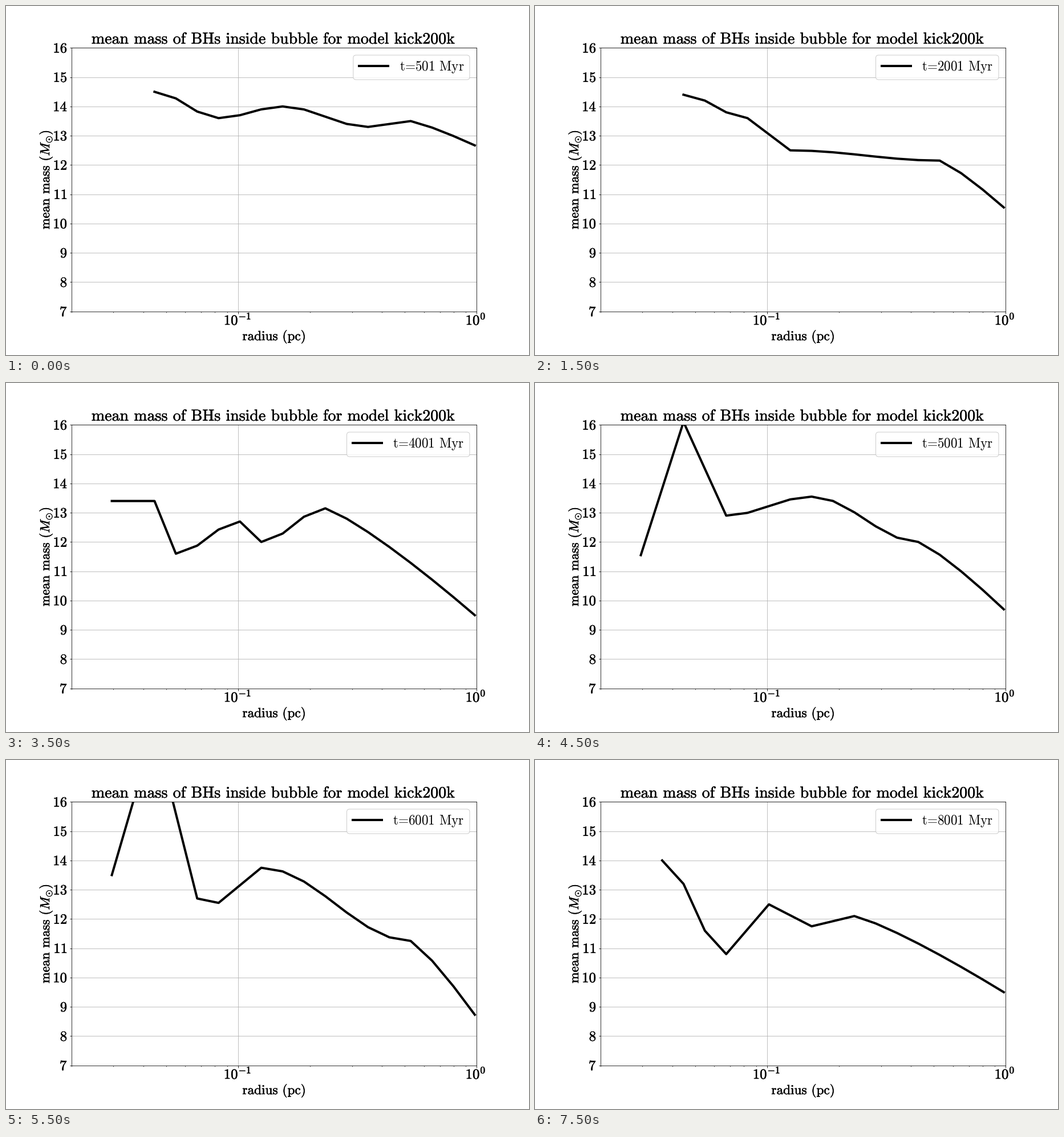
These frames come from a looping animation (917 px wide and 611 px high, 8 s). A matplotlib script:

```python
import math

import matplotlib.pyplot as plt
import numpy as np
from matplotlib.animation import FuncAnimation
from matplotlib.patches import FancyBboxPatch
from matplotlib.patheffects import withStroke
from matplotlib.ticker import NullFormatter

W, H, DPI = 917, 611, 64
PX = 72 / DPI  # points per pixel
FRAMES, INTERVAL = 16, 500
BINS = np.arange(19)
RADIUS = 10 ** (-0.008 - 0.0895 * BINS[::-1])

plt.rcParams["mathtext.fontset"] = "cm"

# Turning points (bin, mean mass) of the profile at some steps.
PROFILES = {
    0: [(3, 14.5), (6, 13.6), (9, 14.0), (13, 13.3), (15, 13.5), (18, 12.67)],
    3: [(3, 14.4), (6, 13.6), (8, 12.5), (15, 12.15), (18, 10.55)],
    7: [(1, 13.4), (3, 13.4), (4, 11.6), (7, 12.7), (8, 12.0), (11, 13.15),
        (18, 9.5)],
    9: [(1, 11.55), (3, 16.1), (5, 12.9), (9, 13.55), (14, 12.0), (18, 9.7)],
    11: [(1, 13.5), (3, 18.5), (5, 12.7), (6, 12.55), (8, 13.75), (15, 11.25),
         (18, 8.73)],
    13: [(0, 14.35), (2, 14.35), (8, 12.0), (10, 12.8), (14, 11.65),
         (17, 9.9), (18, 9.9)],
    15: [(2, 14.0), (5, 10.8), (7, 12.5), (9, 11.75), (11, 12.1), (18, 9.5)],
}


def profile(points):
    """Ease between the turning points, then fall away towards the edge."""
    k, m = np.array(points).T
    seg = np.clip(np.searchsorted(k, BINS, side="right") - 1, 0, len(k) - 2)
    u = np.clip((BINS - k[seg]) / (k[seg + 1] - k[seg]), 0, 1)
    ease = np.where(seg == len(k) - 2, u ** 1.2, (1 - np.cos(np.pi * u)) / 2)
    return m[seg] + (m[seg + 1] - m[seg]) * ease


def masses(step):
    """First filled bin and the mean masses, blended between known steps."""
    a = max(s for s in PROFILES if s <= step)
    b = min(s for s in PROFILES if s >= step)
    w = (step - a) / max(b - a, 1)
    p, q = PROFILES[a], PROFILES[b]
    first = math.ceil((1 - w) * p[0][0] + w * q[0][0] - 1e-9)
    return first, ((1 - w) * profile(p) + w * profile(q))[first:]


def rm(s):
    """Upright math text with full word spaces and a tight equals sign."""
    s = s.replace(" ", r"\hspace{0.38}")
    s = s.replace("=", r"\hspace{-0.2}=\hspace{-0.2}")
    return r"\mathrm{%s}" % s


fig = plt.figure(figsize=(W / DPI, H / DPI), dpi=DPI, facecolor="white")

ax = fig.add_axes([0.125, 0.125, 0.775, 0.755])
ax.set_xscale("log")
ax.set_xlim(0.02, 1)
ax.set_ylim(7, 16)
ax.set_yticks(range(7, 17))
ax.xaxis.set_minor_formatter(NullFormatter())
ax.grid(True, color="#b0b0b0", lw=0.8 * PX)
ax.tick_params(which="major", length=3.5 * PX, width=0.8 * PX,
               labelbottom=False, labelleft=False)
ax.tick_params(which="minor", length=2 * PX, width=0.6 * PX)
for spine in ax.spines.values():
    spine.set_linewidth(0.8 * PX)
curve, = ax.plot([], [], color="black", lw=4 * PX,
                 solid_capstyle="projecting", solid_joinstyle="round")

# Pixel-based layer for the lettering and the legend.
page = fig.add_axes([0, 0, 1, 1])
page.set_xlim(0, W)
page.set_ylim(H, 0)
page.axis("off")


def text(x, y, s, size, ha="center", **kw):
    return page.text(x, y, f"${s}$", fontsize=size * PX, ha=ha,
                     va="baseline", **kw)


def label(*args, **kw):
    """Text with slightly heavier strokes."""
    heavy = [withStroke(linewidth=0.5 * PX, foreground="black")]
    return text(*args, path_effects=heavy, **kw)


label(469, 66, rm("mean mass of BHs inside bubble for model kick200k"), 27.9)
label(470, 585, rm("radius (pc)"), 23.3)
label(76, 304, rm("mean mass (") + r"M_{\odot}" + rm(")"), 23.3,
      rotation=90, rotation_mode="anchor")
for v in range(7, 17):
    y = H * (0.12 + 0.755 * (16 - v) / 9)
    label(108, y + 8.3, rm(str(v)), 24.7, ha="right")
label(406, 558, "10^{-1}", 24.7)
label(823.5, 558, "10^{0}", 24.7)

box = FancyBboxPatch((597.5, 86), 215.5, 43,
                     boxstyle="round,pad=0,rounding_size=5",
                     fc=(1, 1, 1, 0.8), ec="#cccccc", lw=PX)
page.add_patch(box)
handle, = page.plot([], [], color="black", lw=4 * PX,
                    solid_capstyle="projecting")
stamp = text(803, 113.5, rm("t=501 Myr"), 23.2, ha="right")


def draw(step):
    first, m = masses(step)
    curve.set_data(RADIUS[first:], m)
    time = 501 + 500 * step
    left = 597.5 if time > 999 else 608.8
    box.set_bounds(left, 86, 813 - left, 43)
    handle.set_data([left + 10, left + 61], [105, 105])
    stamp.set_text(f"${rm(f't={time} Myr')}$")
    return curve, box, handle, stamp


anim = FuncAnimation(fig, draw, frames=FRAMES, interval=INTERVAL,
                     repeat=True, repeat_delay=0, blit=False)
plt.show()
```
